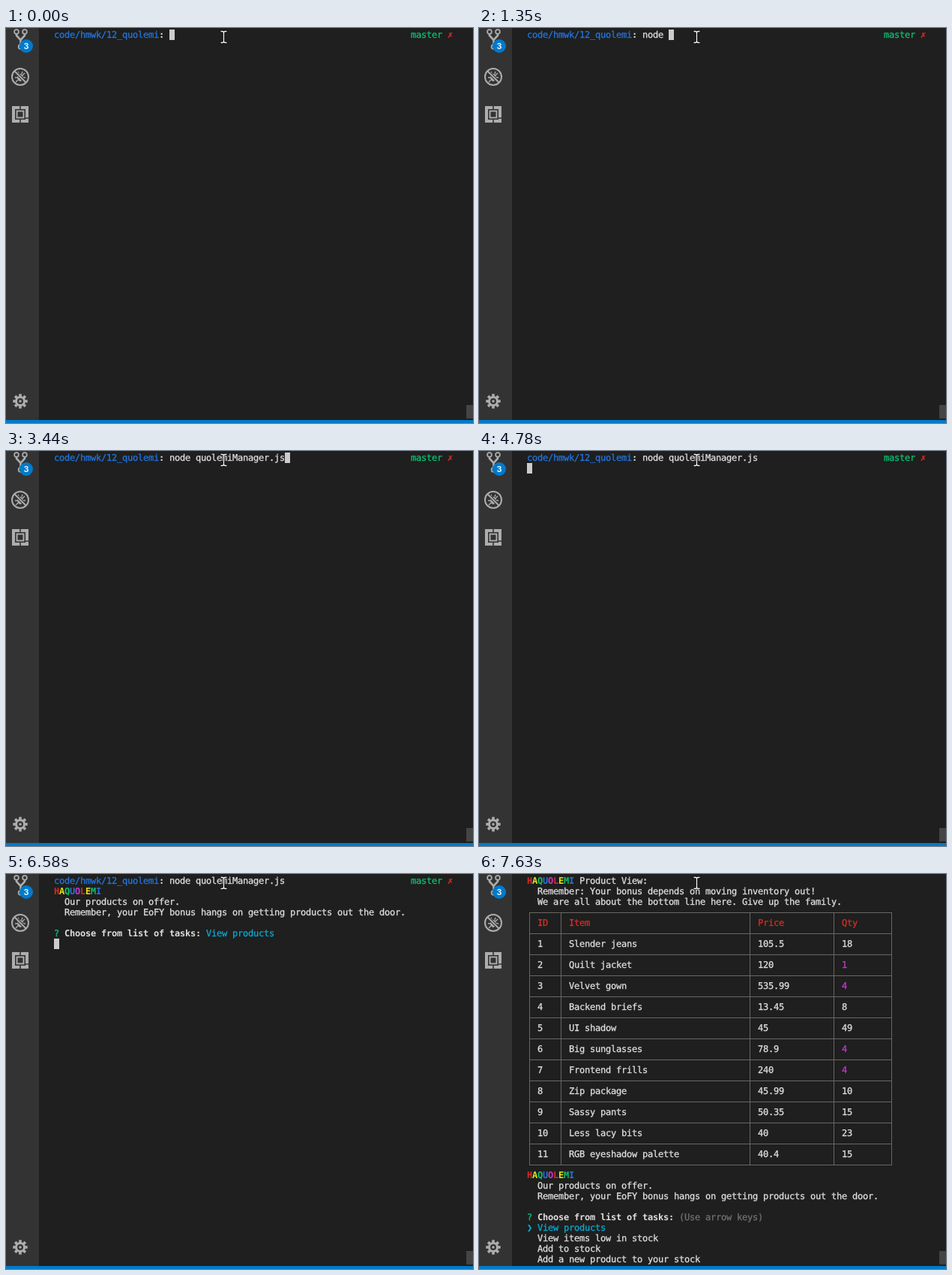
Recreate the animation shown at these times as an HTML page. Size 623 by 526 pixels, loop 8 s.

```html
<!DOCTYPE html>
<html lang="en">
<head>
<meta charset="utf-8">
<title>Terminal session</title>
<style>
html, body { margin: 0; width: 100%; height: 100%; overflow: hidden; background: #1e1f1e; }
svg { display: block; width: 623px; height: 526px; }
#term text { font: 12px "DejaVu Sans Mono", monospace; white-space: pre; text-rendering: geometricPrecision; stroke-width: .3px; }
#term .b { font-weight: 700; stroke-width: 0; }
</style>
</head>
<body>
<svg viewBox="0 0 623 526" width="623" height="526">
  <rect width="623" height="526" fill="#1e1f1e"/>
  <rect width="44" height="522" fill="#333"/>

  <g fill="none" stroke="#adadad" stroke-width="1.7">
    <circle cx="14" cy="5" r="2.9"/>
    <circle cx="25" cy="5" r="2.9"/>
    <circle cx="19.5" cy="25" r="2.9"/>
    <path d="M14 8V10L19.5 16L25 10V8M19.5 15V22" stroke-width="2.6"/>
  </g>
  <circle cx="27" cy="24" r="9" fill="#007acc"/>
  <text x="27" y="28" text-anchor="middle" fill="#fff" font-family="Inter, Roboto, sans-serif" font-size="11" font-weight="600">3</text>

  <g fill="none" stroke="#adadad">
    <ellipse cx="19" cy="66" rx="3.8" ry="5" fill="#adadad" stroke="none"/>
    <path d="M12 66H26M13 60L16 63H22L25 60M13 72L16 69M25 72L22 69M17 61L16 58M21 61L22 58" stroke-width="1.4"/>
    <path d="M11 57L27 73" stroke="#333" stroke-width="4"/>
    <circle cx="19" cy="65" r="11" stroke-width="2"/>
    <path d="M11 57L27 73" stroke-width="2"/>
  </g>

  <rect x="8" y="104" width="22" height="22" fill="#adadad"/>
  <g fill="none" stroke="#333" stroke-width="1.6">
    <rect x="12.8" y="108.8" width="12.4" height="12.4"/>
    <rect x="15.5" y="111.5" width="7" height="7" fill="#333" stroke="none"/>
    <path d="M19 104V109M19 121V126M25 120H30"/>
  </g>

  <g id="gear" fill="none" stroke="#adadad">
    <circle cx="19" cy="497" r="5.5" stroke-width="3"/>
    <circle cx="19" cy="497" r="1.8" fill="#adadad" stroke="none"/>
  </g>

  <g id="term"></g>

  <rect x="614" y="502" width="9" height="18" fill="#434443"/>
  <rect y="522" width="623" height="4" fill="#007acc"/>
  <g id="pointer" fill="none" stroke-linecap="round"></g>
</svg>
<script>
const NS = 'http://www.w3.org/2000/svg';
const LOOP = 8000, CELL = 7, LINE = 14, LEFT = 64, TOP = 2;
const C = {
  fg: '#dedede', red: '#d62c27', green: '#0cc074', yellow: '#e5e510',
  blue: '#2474de', magenta: '#c438ca', cyan: '#0aa9d3', gray: '#707070'
};
const BRAND = 'HAQUOLEMI';
const COMMAND = 'node quolemiManager.js';
const KEYS = [[0, 0], [750, 2], [1050, 3], [1200, 4], [1350, 5], [2690, 6], [2840, 7], [3440, 22]];
const ENTER = 4780, MENU = 5230, PICK = 6580, TABLE = 6730, AGAIN = 7630;
const ITEMS = [
  ['Slender jeans', '105.5', 18], ['Quilt jacket', '120', 1], ['Velvet gown', '535.99', 4],
  ['Backend briefs', '13.45', 8], ['UI shadow', '45', 49], ['Big sunglasses', '78.9', 4],
  ['Frontend frills', '240', 4], ['Zip package', '45.99', 10], ['Sassy pants', '50.35', 15],
  ['Less lacy bits', '40', 23], ['RGB eyeshadow palette', '40.4', 15]
];
const term = document.getElementById('term');
let scroll = 0;

function add(parent, tag, attrs) {
  const el = document.createElementNS(NS, tag);
  for (const k in attrs) el.setAttribute(k, attrs[k]);
  return parent.appendChild(el);
}

const colX = col => LEFT + col * CELL;
const rowY = row => TOP + (row - scroll) * LINE;

// Each glyph sits in its own terminal cell.
function print(row, col, str, fill = C.fg, bold = false) {
  if (row < scroll) return;
  const x = [...str].map((_, i) => colX(col + i)).join(' ');
  const el = add(term, 'text', { x, y: rowY(row) + 11, fill, stroke: fill });
  if (bold) el.setAttribute('class', 'b');
  el.textContent = str;
}

function cursor(row, col) {
  add(term, 'rect', { x: colX(col), y: rowY(row), width: CELL, height: LINE, fill: '#ccc' });
}

function brand(row) {
  const hues = [C.red, C.yellow, C.green, C.blue, C.magenta];
  [...BRAND].forEach((ch, i) => print(row, i, ch, hues[i % 5], true));
}

function prompt(typed) {
  print(0, 0, 'code/hmwk/12_quolemi', C.blue);
  print(0, 20, ':', C.fg, true);
  print(0, 22, COMMAND.slice(0, typed));
  print(0, 68, 'master', C.green);
  print(0, 75, '✗', C.red);
}

function intro(row, picked) {
  brand(row);
  print(row + 1, 2, 'Our products on offer.');
  print(row + 2, 2, 'Remember, your EoFY bonus hangs on getting products out the door.');
  print(row + 4, 0, '?', C.green);
  print(row + 4, 2, 'Choose from list of tasks:', C.fg, true);
  if (picked) {
    print(row + 4, 29, 'View products', C.cyan);
    return;
  }
  print(row + 4, 29, '(Use arrow keys)', C.gray);
  print(row + 5, 0, '❯ View products', C.cyan);
  ['View items low in stock', 'Add to stock', 'Add a new product to your stock']
    .forEach((s, i) => print(row + 6 + i, 2, s));
}

function table(row) {
  brand(row);
  print(row, 10, 'Product View:');
  print(row + 1, 2, 'Remember: Your bonus depends on moving inventory out!');
  print(row + 2, 2, 'We are all about the bottom line here. Give up the family.');

  const first = row + 3, cols = [2, 8, 44, 60];
  const y0 = rowY(first) + 7.5, y1 = y0 + (ITEMS.length + 1) * 2 * LINE;
  let d = '';
  for (let y = y0; y <= y1; y += 2 * LINE) d += `M67 ${y}H551`;
  for (const c of [0, 6, 42, 58, 69]) d += `M${colX(c) + 3.5} ${y0}V${y1}`;
  add(term, 'path', { d, stroke: '#6a6766', fill: 'none' });

  ['ID', 'Item', 'Price', 'Qty'].forEach((s, i) => print(first + 1, cols[i], s, C.red));
  ITEMS.forEach(([name, price, qty], n) => {
    [n + 1, name, price, qty].forEach((v, i) =>
      print(first + 3 + n * 2, cols[i], String(v), i === 3 && qty < 5 ? C.magenta : C.fg));
  });
}

function draw(t) {
  term.replaceChildren();
  scroll = t >= AGAIN ? 6 : 0;
  const typed = KEYS.filter(k => k[0] <= t).pop()[1];
  prompt(typed);
  if (t < ENTER) cursor(0, 22 + typed);
  else if (t < MENU) cursor(1, 0);
  else intro(1, t >= PICK);
  if (t >= PICK && t < TABLE) cursor(6, 0);
  if (t >= TABLE) table(6);
  if (t >= TABLE && t < AGAIN) cursor(34, 0);
  if (t >= AGAIN) intro(34, false);
}

const BEAM = 'M287 4.5H288.5Q290.5 4.5 290.5 6.5V17.5Q290.5 19.5 288.5 19.5H287' +
  'M294 4.5H292.5Q290.5 4.5 290.5 6.5M294 19.5H292.5Q290.5 19.5 290.5 17.5';
for (const [stroke, width] of [['#000', 2.6], ['#fff', 1.3]]) {
  add(document.getElementById('pointer'), 'path', { d: BEAM, stroke, 'stroke-width': width });
}

const gear = document.getElementById('gear');
for (let a = 0; a < 360; a += 45) {
  add(gear, 'path', { d: 'M19 491V487.3', 'stroke-width': 3.6, transform: `rotate(${a} 19 497)` });
}

const STEPS = [...KEYS.map(k => k[0]), ENTER, MENU, PICK, TABLE, AGAIN];
const start = performance.now();
let shown = -1;
function frame() {
  const t = Math.max(0, performance.now() - start) % LOOP;
  const step = STEPS.filter(s => s <= t).length;
  if (step !== shown) {
    shown = step;
    draw(t);
  }
  requestAnimationFrame(frame);
}
frame();
</script>
</body>
</html>
```
